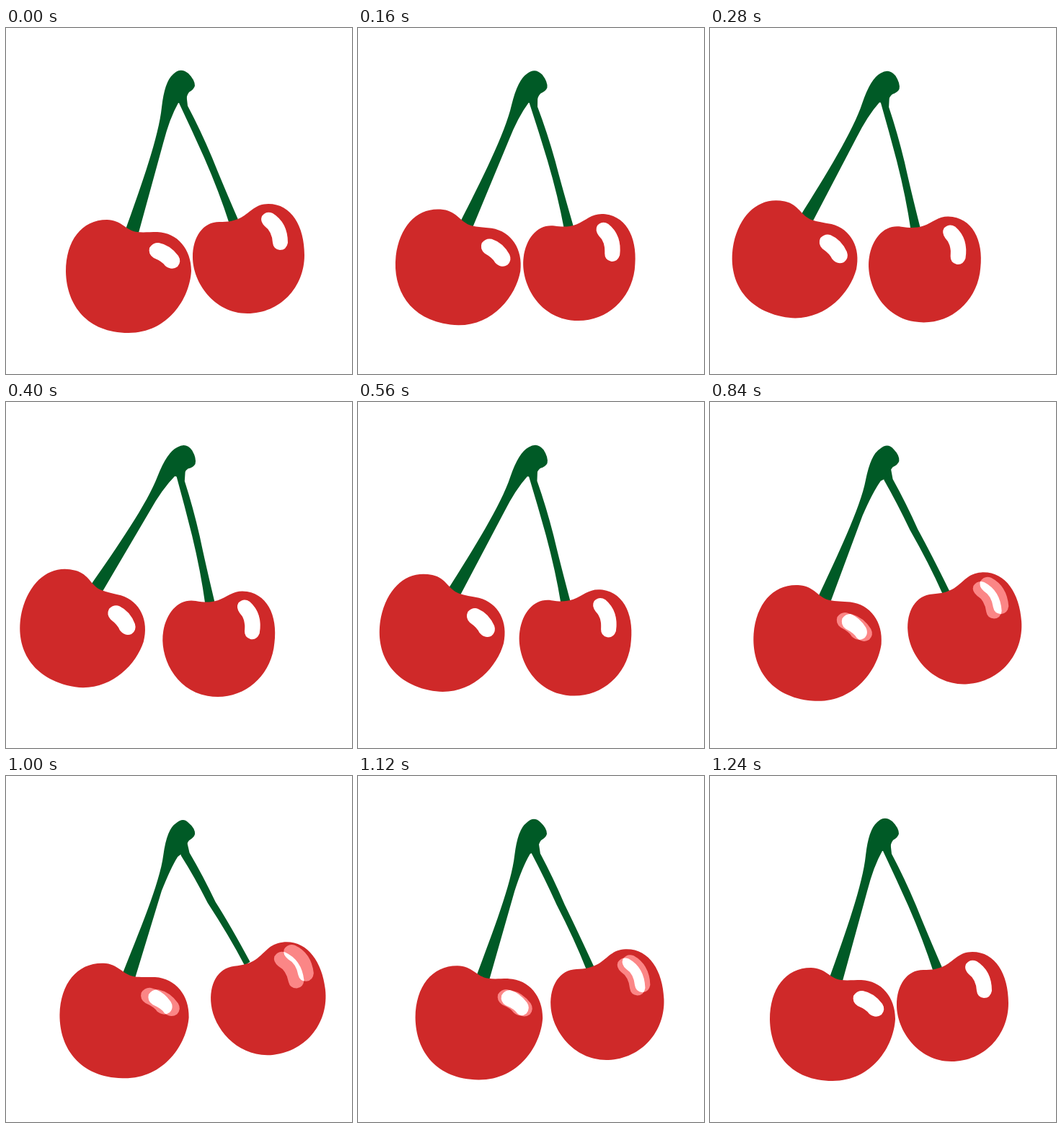
An HTML page with a canvas that plays this animation: 480x480 px, repeating every 1.28 s.

```html
<!DOCTYPE html>
<html>
<head>
<meta charset="utf-8">
<title>Swinging cherries</title>
<style>
  html, body { margin: 0; overflow: hidden; background: #fff; }
  canvas { display: block; }
</style>
</head>
<body>
<canvas id="stage" width="480" height="480"></canvas>
<script>
const ctx = document.getElementById('stage').getContext('2d');
const GREEN = '#005a26', RED = '#cf2929', PINK = '#fb8686';
const LOOP = 1280, STEP = 40, REST = 1240;
const PIVOT = [240, 85];

// [time in ms, value]; angles are degrees clockwise from the resting pose
const leftSwing = [[0, 0], [160, 7.2], [400, 15.1], [560, 12.5], [840, 5], [1000, 1.6], [1120, 0.6], [REST, 0]];
const rightSwing = [[0, 0], [160, 7.2], [400, 10], [560, 8.5], [840, -4], [920, -9.6], [1000, -6.6], [1120, -2.2], [REST, 0]];
// 0 is the crisp pose, 1 the loosest one: split highlights, thinner stems
const softening = [[0, 0], [560, 0], [840, 0.7], [1000, 1], [REST, 0]];

const leftCherry = {
  center: [170, 344],
  shift: [1, -2.5],
  shineShift: [-2, 1],
  spread: [5, 1],
  body: new Path2D('M83 338C83 295 105 266 140 266C160 266 166 281 182 283C190 284 199 283 210 283C238 284 257 307 257 337C255 375 225 423 170 423C113 423 84 385 83 338Z'),
  shine: new Path2D('M212 298Q228 301 239 316Q244 324 238 331Q230 337 221 330Q217 324 205 319Q197 314 199 305Q204 297 212 298Z')
};
const rightCherry = {
  center: [336, 320],
  shift: [1, 3],
  shineShift: [3, -3],
  spread: [7, -4],
  body: new Path2D('M259 318C259 290 273 269 296 269C308 269 316 268 326 263C340 255 346 244 364 244C396 244 414 275 414 315C414 360 380 396 335 396C288 396 259 352 259 318Z'),
  shine: new Path2D('M370 257Q391 270 391 298Q389 308 380 308Q371 307 370 298Q369 282 359 275Q352 268 355 261Q361 253 370 257Z')
};

// Slope at key i of a looping track; flat at turning points
function slope(keys, i) {
  const last = keys.length - 1;
  const [t, v] = keys[i];
  const [t0, v0] = i ? keys[i - 1] : [keys[last - 1][0] - REST, keys[last - 1][1]];
  const [t1, v1] = i < last ? keys[i + 1] : [keys[1][0] + REST, keys[1][1]];
  return (v - v0) * (v1 - v) <= 0 ? 0 : (v1 - v0) / (t1 - t0);
}

function sample(keys, t) {
  const i = Math.min(keys.findLastIndex(k => k[0] <= t), keys.length - 2);
  const [t0, a] = keys[i], [t1, b] = keys[i + 1];
  const d = t1 - t0, u = (t - t0) / d, r = 1 - u;
  return r * r * ((1 + 2 * u) * a + u * d * slope(keys, i))
       + u * u * ((3 - 2 * u) * b - r * d * slope(keys, i + 1));
}

function fill(path, color) {
  ctx.fillStyle = color;
  ctx.fill(path);
}

function around([x, y], transform, draw) {
  ctx.save();
  ctx.translate(x, y);
  transform();
  ctx.translate(-x, -y);
  draw();
  ctx.restore();
}

const swing = (degrees, draw) =>
  around(PIVOT, () => ctx.rotate(degrees * Math.PI / 180), draw);

const move = ([x, y], amount) => ctx.translate(x * amount, y * amount);

function drawCherry({ center, shift, shineShift, spread, body, shine }, soft) {
  around(center, () => {
    move(shift, soft);
    ctx.scale(1 + 0.03 * soft, 1 + 0.01 * soft);
  }, () => {
    fill(body, RED);
    // Two shifted highlights, white only where they overlap
    move(shineShift, soft);
    move(spread, -soft);
    fill(shine, PINK);
    move(spread, 2 * soft);
    fill(shine, PINK);
    ctx.clip(shine);
    move(spread, -2 * soft);
    fill(shine, '#fff');
  });
}

function leftStem(soft) {
  const x = 3 * soft, y = 2 * soft, fork = 104 + 8 * soft;
  return new Path2D(`M${232 + x} ${64 + y}Q${242 + x} ${54 + y} 253 ${63 + y}Q262 72 262 80Q261 85 254 89Q250 94 250 103L239 ${fork}Q${227 + x} ${125 + y} 218 160L184 284L178 290L165 282C188 218 ${212 + x} 150 ${216 + x} 110Q${220 + x} 74 ${232 + x} ${64 + y}Z`);
}

function rightStem(soft) {
  const end = 323 - 5 * soft, bend = 6 * soft, fork = 104 + 7 * soft;
  return new Path2D(`M238 100L240 ${fork}Q${258 - bend / 2} 142 ${275 - bend} 180Q${296 - bend / 2} 228 310 272L${end} 268Q${300 - bend / 2} 215 ${286 - bend} 180Q${270 - bend / 2} 142 252 108L250 90Z`);
}

function draw(now) {
  const t = Math.floor(now % LOOP / STEP) * STEP;
  const left = sample(leftSwing, t), right = sample(rightSwing, t);
  const soft = sample(softening, t);
  ctx.fillStyle = '#fff';
  ctx.fillRect(0, 0, 480, 480);
  swing(right, () => fill(rightStem(soft), GREEN));
  swing(left, () => fill(leftStem(soft), GREEN));
  swing(left, () => drawCherry(leftCherry, soft));
  swing(right, () => drawCherry(rightCherry, soft));
}

let start;
function frame(now) {
  start ??= now;
  draw(now - start);
  requestAnimationFrame(frame);
}
draw(0);
requestAnimationFrame(frame);
</script>
</body>
</html>
```
